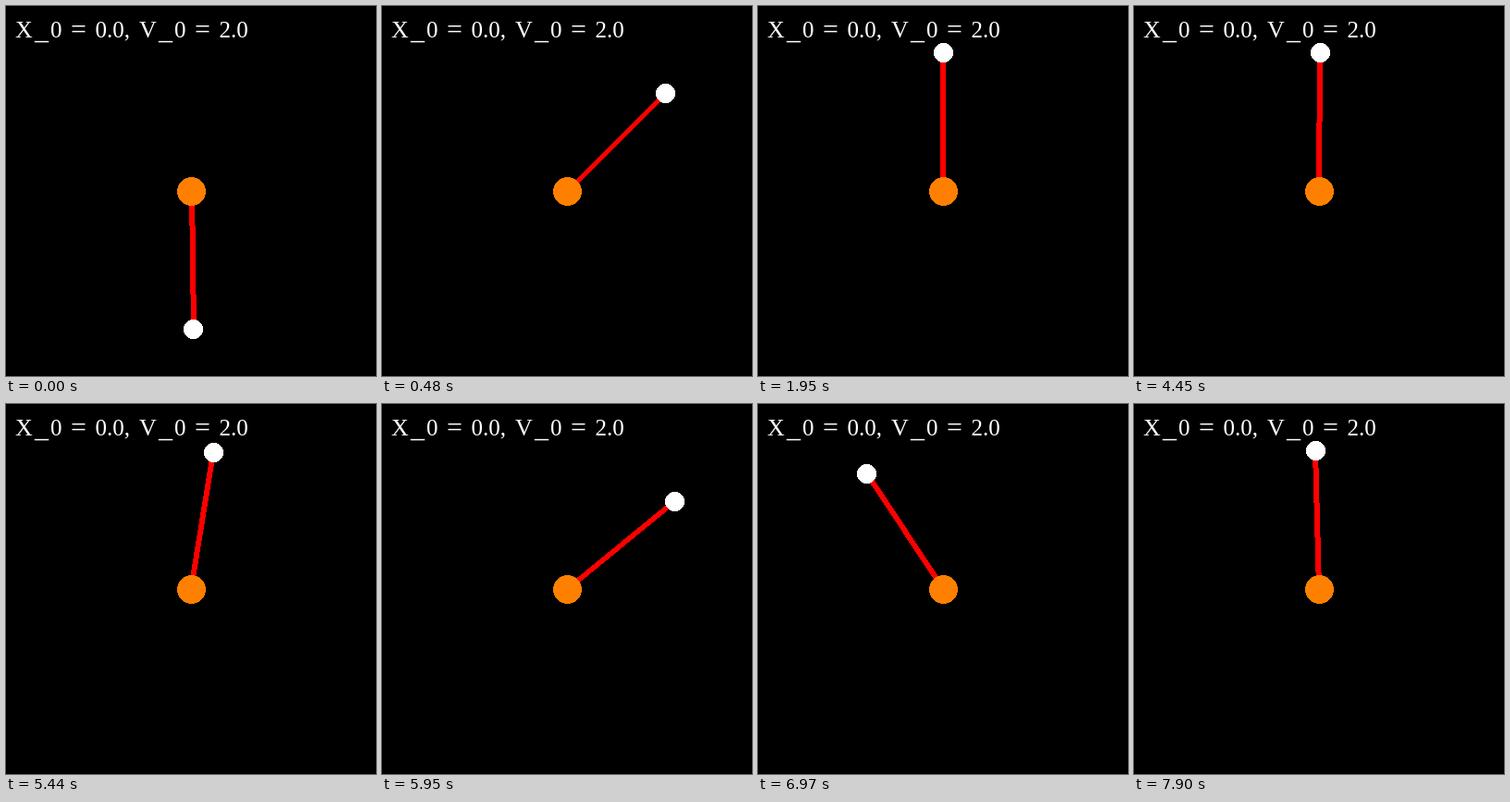
These frames come from a looping animation (400x400 px, 7990 ms). An HTML page with a canvas:

```html
<!DOCTYPE html>
<html lang="en">
<head>
<meta charset="utf-8">
<title>Pendulum at the separatrix</title>
<style>
  html, body { margin: 0; width: 100%; height: 100%; overflow: hidden; background: #000; }
  canvas { display: block; }
</style>
</head>
<body>
<canvas id="stage" width="400" height="400"></canvas>
<script>
const ctx = document.getElementById('stage').getContext('2d');
const LOOP = 7990, CENTER = 200, LENGTH = 150, ROD = 6;

// Playback clock: [milliseconds, simulation step]
const CLOCK = [[0, 0], [1590, 53], [1720, 57], [1950, 64], [4450, 139],
               [4680, 146], [4810, 150], [LOOP, 256]];

// Label pieces: [text, x, baseline, font size]
const LABEL = [['X', 10, 34, 26], ['_', 31, 36, 30], ['0', 48, 34, 25], ['=', 70, 35, 30],
               ['0.0,', 96.5, 34, 25], ['V', 144, 34, 26], ['_', 165, 36, 30],
               ['0', 182, 34, 25], ['=', 204, 35, 30], ['2.0', 230.5, 34, 25]];

function stepAt(t) {
  let i = 1;
  while (i < CLOCK.length - 1 && t >= CLOCK[i][0]) i++;
  const [t0, n0] = CLOCK[i - 1], [t1, n1] = CLOCK[i];
  return Math.floor(n0 + (n1 - n0) * (t - t0) / (t1 - t0) + 1e-6);
}

// Separatrix solution of a'' = -sin(a): climbs to the top, lingers, falls back
function angleAt(n) {
  const s = n < 101 ? 0.01 + 0.1 * n : 20.287 - 0.1 * n;
  return 4 * Math.atan(Math.tanh(s / 2));
}

// Hard-edged disc made of pixel rows
function disc(x, y, r, color) {
  ctx.fillStyle = color;
  for (let dy = -r; dy <= r; dy++) {
    const w = Math.floor(Math.sqrt((r + 0.5) ** 2 - dy * dy));
    ctx.fillRect(x - w, y + dy, 2 * w + 1, 1);
  }
}

// Round to nearest, halves away from zero or towards it
const roundUp = v => Math.sign(v) * Math.floor(Math.abs(v) + 0.5);
const roundDown = v => Math.sign(v) * Math.ceil(Math.abs(v) - 0.5);

// Hard-edged convex polygon made of pixel rows
function polygon(points, color) {
  const ys = points.map(p => p[1]);
  ctx.fillStyle = color;
  for (let y = Math.min(...ys); y <= Math.max(...ys); y++) {
    const xs = [];
    points.forEach(([x0, y0], i) => {
      const [x1, y1] = points[(i + 1) % points.length];
      if (y0 === y1) {
        if (y === y0) xs.push(x0, x1);
      } else if ((y - y0) * (y - y1) <= 0) {
        xs.push(x0 + (x1 - x0) * (y - y0) / (y1 - y0));
      }
    });
    const left = roundUp(Math.min(...xs)), right = roundDown(Math.max(...xs));
    if (right >= left) ctx.fillRect(left, y, right - left + 1, 1);
  }
}

// Thick line with corners snapped to whole pixels
function rod(x, y) {
  const dx = x - CENTER, dy = y - CENTER, len = Math.hypot(dx, dy);
  const near = ROD / 2 - 1, far = ROD / 2;
  const nx = roundDown(near * dy / len), fx = roundDown(far * dy / len);
  const ny = roundUp(near * dx / len), fy = roundUp(far * dx / len);
  polygon([[CENTER - nx, CENTER + fy], [x - nx, y + fy],
           [x + fx, y - ny], [CENTER + fx, CENTER - ny]], '#f00');
}

function label() {
  ctx.fillStyle = '#fff';
  for (const [text, x, y, size] of LABEL) {
    ctx.font = `${size}px "Liberation Serif", serif`;
    ctx.fillText(text, x, y);
  }
}

function draw() {
  const a = angleAt(stepAt(performance.now() % LOOP));
  const x = Math.floor(CENTER + LENGTH * Math.sin(a));
  const y = Math.floor(CENTER + LENGTH * Math.cos(a));
  ctx.fillStyle = '#000';
  ctx.fillRect(0, 0, 400, 400);
  label();
  rod(x, y);
  disc(CENTER, CENTER, 15, '#ff7f00');
  disc(x, y, 10, '#fff');
  requestAnimationFrame(draw);
}
draw();
</script>
</body>
</html>
```
